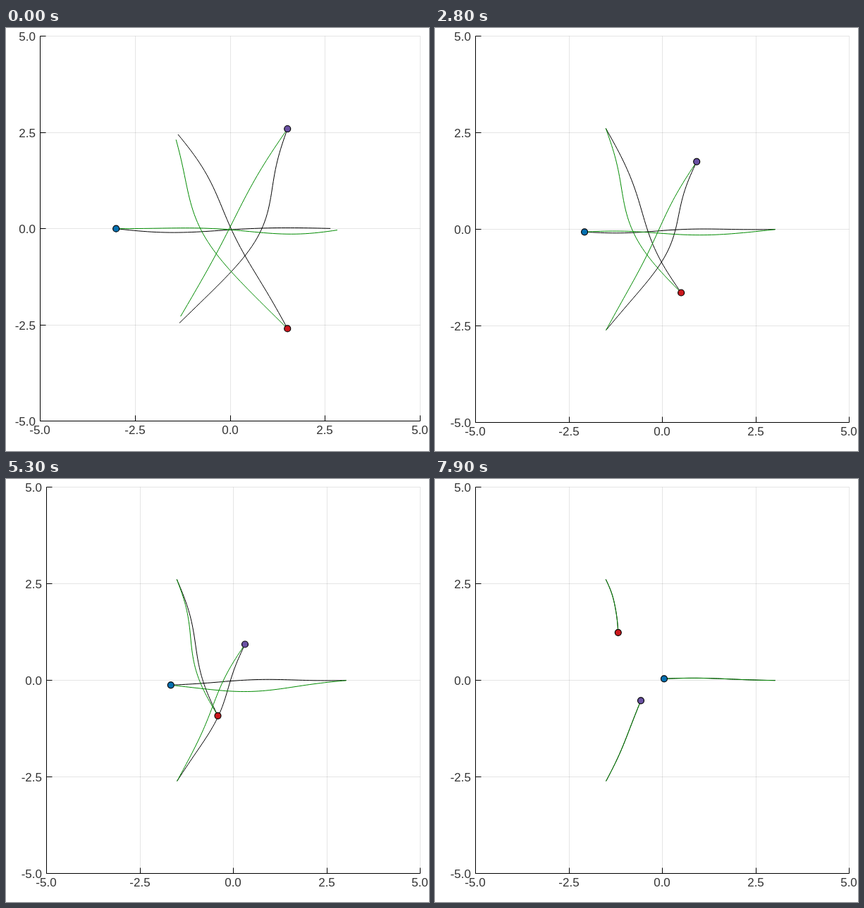
Animation of 600x600 px, one loop 8 s. Source, as an HTML page:

```html
<!DOCTYPE html>
<html lang="en">
<head>
<meta charset="utf-8">
<title>Three agents crossing</title>
<style>
  html, body { margin: 0; width: 100%; height: 100%; overflow: hidden; background: #fff; }
  svg { display: block; width: 600px; height: 600px; }
  text { font: 17px "Liberation Sans", Arial, sans-serif; fill: #333; }
  .grid { stroke: #000; stroke-opacity: .1; fill: none; }
  .axis { stroke: #000; fill: none; }
  .plan { fill: none; stroke-width: 1; }
  .dot { stroke: #000; stroke-width: 1.2; }
</style>
</head>
<body>
<svg viewBox="0 0 600 600"></svg>
<script>
const LOOP = 8000, STEP = 100, SEGMENTS = 48;
const DOT_TIMES = [0, 800, 2000, 3600, 5300, 6200, 7900];
const BEND_TIMES = [0, 3600, 6200, 7900];
const BLACK = '#000', GREEN = '#008a00';
const svg = document.querySelector('svg');

function add(parent, tag, attrs = {}, text = '') {
  const el = document.createElementNS('http://www.w3.org/2000/svg', tag);
  for (const key in attrs) el.setAttribute(key, attrs[key]);
  el.textContent = text;
  parent.append(el);
  return el;
}

const mix = (a, b, u) => a + (b - a) * u;

// Index of the interval of times that holds t.
function interval(times, t) {
  let i = 0;
  while (i < times.length - 2 && t > times[i + 1]) i++;
  return i;
}

// Smooth motion through one value per entry of DOT_TIMES.
function track(keys) {
  const T = DOT_TIMES, n = T.length - 1;
  const h = i => T[i + 1] - T[i];
  const rate = i => (keys[i + 1] - keys[i]) / h(i);
  const m = keys.map((_, i) => i > 0 && i < n
    ? (rate(i - 1) * h(i) + rate(i) * h(i - 1)) / (h(i - 1) + h(i)) : 0);
  m[0] = (3 * rate(0) - m[1]) / 2;
  m[n] = (3 * rate(n - 1) - m[n - 1]) / 2;
  return t => {
    const i = interval(T, t), u = (t - T[i]) / h(i), v = 1 - u;
    return v * v * ((1 + 2 * u) * keys[i] + u * h(i) * m[i])
         + u * u * ((1 + 2 * v) * keys[i + 1] - v * h(i) * m[i + 1]);
  };
}

// Two plot layouts; the wide one shows only at the very start.
const wide = { left: 48, bottom: 557, cx: 318.2, cy: 284.7, sx: 54, sy: 54.5 };
const main = { left: 57, bottom: 559, cx: 322.5, cy: 285.5, sx: 53.1, sy: 54.7 };
const RIGHT = 587, TOP = 11;

function drawAxes({ left, bottom }) {
  const g = add(svg, 'g');
  const l = left + .5, r = RIGHT + .5, t = TOP + .5, b = bottom + .5;
  let grid = '', axis = `M${l} ${t}V${b}H${r}`;
  for (let k = 0; k <= 4; k++) {
    const x = Math.round(mix(left, RIGHT, k / 4)) + .5;
    const y = Math.round(mix(bottom, TOP, k / 4)) + .5;
    const label = (2.5 * k - 5).toFixed(1);
    grid += `M${x} ${t}V${b}M${l} ${y}H${r}`;
    axis += `M${x} ${b}v-8M${l} ${y}h8`;
    add(g, 'text', { x: x - .5, y: b + 18.5, 'text-anchor': 'middle' }, label);
    add(g, 'text', { x: l - 6.5, y: y + 6, 'text-anchor': 'end' }, label);
  }
  add(g, 'path', { class: 'grid', d: grid });
  add(g, 'path', { class: 'axis', d: axis });
  return g;
}

const wideAxes = drawAxes(wide), mainAxes = drawAxes(main);
const layers = { [BLACK]: add(svg, 'g'), [GREEN]: add(svg, 'g'), dots: add(svg, 'g') };
const agents = [], plans = [];

// bendAxis: 0 bends the plans sideways, 1 up and down.
function agent(fill, bendAxis, goal, xs, ys) {
  const who = {
    bendAxis, goal, x: track(xs), y: track(ys),
    dot: add(layers.dots, 'circle', { class: 'dot', r: 4.5, fill })
  };
  agents.push(who);
  return who;
}

// A plan is a straight line to the goal plus three sine waves, whose sizes
// are given at BEND_TIMES. The first plan covers only part of the way (reach).
function plan(who, stroke, reach, ...bends) {
  plans.push({ who, reach, bends, el: add(layers[stroke], 'path', { class: 'plan', stroke }) });
}

const blue = agent('#0570b0', 1, [482.6, 285.7],
  [163.2, 173.5, 198, 223.3, 233.8, 239.3, 325],
  [285.5, 286, 287.5, 291, 292.3, 292.7, 283.3]);
const purple = agent('#6a51a3', 0, [242.6, 428.6],
  [402.2, 396.7, 382, 360.3, 339, 328.7, 292],
  [143.3, 152.5, 174.3, 204.7, 234.5, 249.8, 314.3]);
const red = agent('#cb181d', 0, [242.3, 142.4],
  [402.2, 394, 368.7, 330.2, 300.5, 283.8, 259.8],
  [427.7, 416.3, 391, 361.3, 335.8, 309.7, 217.8]);

const blueLast = [-1.3, -.6, 0], purpleLast = [2.2, -.6, 0], redLast = [4.4, -.4, .2];
plan(blue, BLACK, .936, [2.1, 3.4, .7], [-1.3, 1, 1.2], [-5, -.7, .6], blueLast);
plan(blue, GREEN, .966, [3, -4.2, 1.6], [5.3, -2.3, -1.3], [14, 3.4, -.7], blueLast);
plan(purple, BLACK, .969, [40.3, -5.3, -3.5], [18.6, -4.1, -3], [6.6, -.9, -1.1], purpleLast);
plan(purple, GREEN, .936, [-2.3, -2.9, -.7], [-.7, -2.4, -1.2], [-2.5, -3.9, -.5], purpleLast);
plan(red, BLACK, .969, [4, -5.2, 2.9], [-5.2, -6.5, -1.5], [-.3, -3.9, .8], redLast);
plan(red, GREEN, .943, [-39.4, -3.4, 2.3], [-20.5, -9.1, -.1], [-1, -3.9, .6], redLast);

// Moves a point from the main layout to the wide one.
const widen = ([x, y]) => [
  wide.cx + (x - main.cx) * wide.sx / main.sx,
  wide.cy + (y - main.cy) * wide.sy / main.sy
];

function drawPlan({ who, reach, bends, el }, t, place) {
  const i = interval(BEND_TIMES, t);
  const u = (t - BEND_TIMES[i]) / (BEND_TIMES[i + 1] - BEND_TIMES[i]);
  const waves = bends[i].map((size, n) => mix(size, bends[i + 1][n], u));
  const start = [who.x(t), who.y(t)], length = t === 0 ? reach : 1;
  const points = [];
  for (let k = 0; k <= SEGMENTS; k++) {
    const s = length * k / SEGMENTS;
    const p = start.map((c, axis) => mix(c, who.goal[axis], s));
    waves.forEach((size, n) => p[who.bendAxis] += size * Math.sin((n + 1) * Math.PI * s));
    points.push(place(p).map(c => c.toFixed(2)).join(' '));
  }
  el.setAttribute('d', 'M' + points.join('L'));
}

function draw(t) {
  const first = t === 0, place = first ? widen : p => p;
  wideAxes.style.display = first ? '' : 'none';
  mainAxes.style.display = first ? 'none' : '';
  for (const p of plans) drawPlan(p, t, place);
  for (const who of agents) {
    const [x, y] = place([who.x(t), who.y(t)]);
    who.dot.setAttribute('cx', x);
    who.dot.setAttribute('cy', y);
  }
}

const begin = performance.now();
function tick() {
  const t = Math.max(0, performance.now() - begin) % LOOP;
  draw(Math.floor(t / STEP) * STEP);
  requestAnimationFrame(tick);
}
tick();
</script>
</body>
</html>
```
